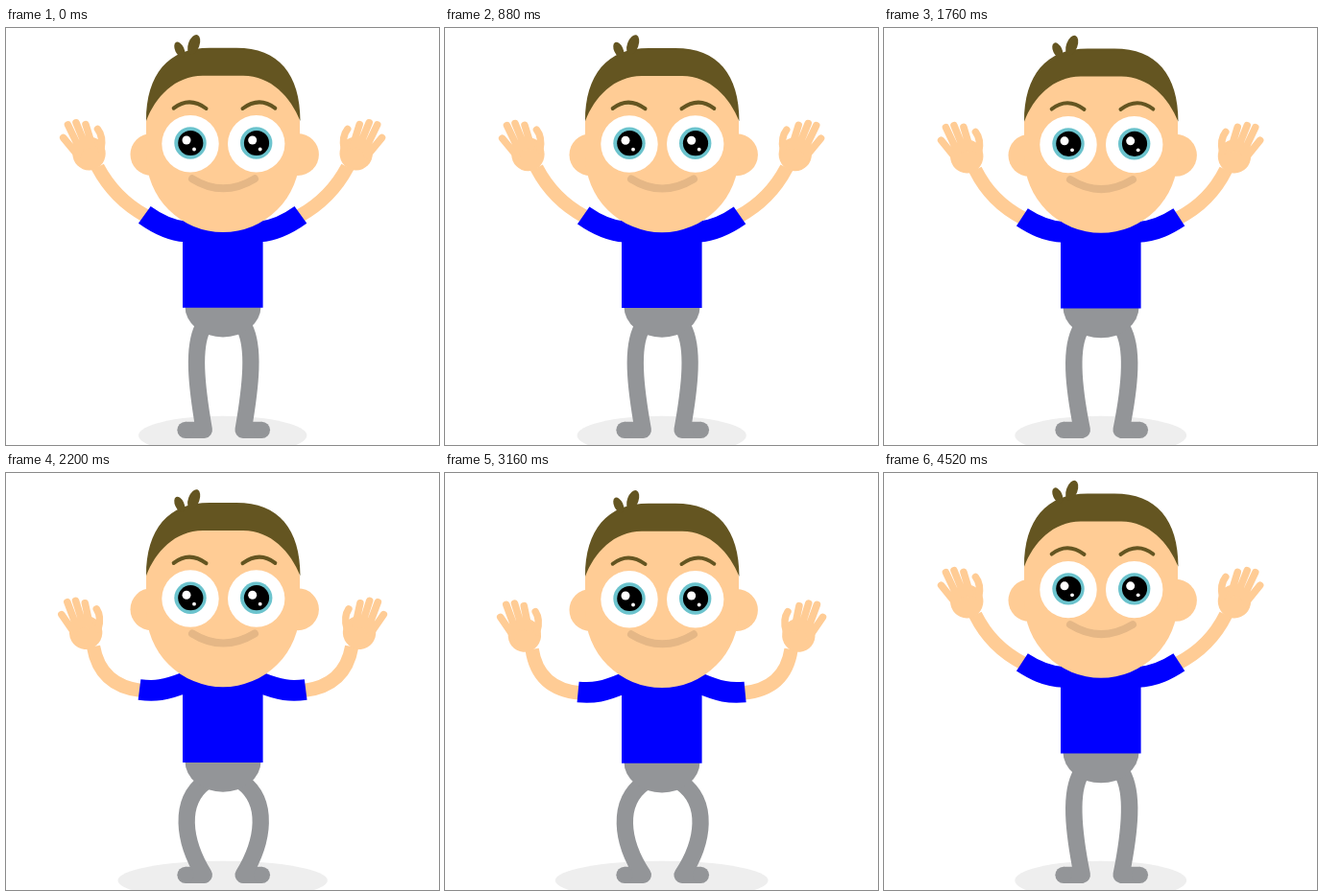
These frames come from a looping animation (451x435 px, 4.56 s). An HTML page with a canvas:

```html
<!DOCTYPE html>
<html lang="en">
<head>
<meta charset="utf-8">
<title>Bouncing boy</title>
<style>
  html, body { margin: 0; width: 100%; height: 100%; overflow: hidden; background: #fff; }
  canvas { display: block; }
</style>
</head>
<body>
<canvas id="stage" width="451" height="435"></canvas>
<script>
const ctx = document.getElementById('stage').getContext('2d');
const SKIN = '#ffcc95', HAIR = '#645521', SHIRT = '#0000ff', TROUSERS = '#939598';
const LOOP = 4560, STEP = 40, BOUNCE = 920;

const mix = (a, b, u) => a.map((v, i) => v + (b[i] - v) * u);

function ellipse(color, x, y, rx, ry = rx, angle = 0) {
  ctx.fillStyle = color;
  ctx.beginPath();
  ctx.ellipse(x, y, rx, ry, angle * Math.PI / 180, 0, 7);
  ctx.fill();
}

function fill(color, d) {
  ctx.fillStyle = color;
  ctx.fill(new Path2D(d));
}

function stroke(color, width, d, cap = 'round') {
  ctx.strokeStyle = color;
  ctx.lineWidth = width;
  ctx.lineCap = cap;
  ctx.lineJoin = 'round';
  ctx.stroke(new Path2D(d));
}

// Draws a part, then its mirror image about a vertical axis
function bothSides(axis, draw) {
  draw();
  ctx.save();
  ctx.translate(2 * axis, 0);
  ctx.scale(-1, 1);
  draw();
  ctx.restore();
}

function leg(u) {
  const p = mix([205, 312.5, 194.5, 333, 198, 371], [207, 322.5, 180, 343, 184, 383], u);
  stroke(TROUSERS, 17.3, `M${p[0]} ${p[1]}C${p.slice(2)} 206.3 419.3L187 419.3`, 'butt');
  ellipse(TROUSERS, 187, 419.3, 8.65);
}

function hand(u) {
  ctx.save();
  ctx.translate(80 - 1.5 * u, 110 + 35 * u);
  ctx.rotate(5 * u * Math.PI / 180);
  ctx.translate(-80, -110);
  ellipse(SKIN, 86.5, 131, 17.2, 17.5);
  stroke(SKIN, 7.5, 'M59.7 114.5L75 133M64.5 101L77 127M73 98.8L83 123M83 100.5L90 123');
  stroke(SKIN, 7.5, 'M95.5 105.5Q101.5 113 99 126');
  ctx.restore();
}

function arm(u) {
  const a = mix([95.5, 145, 113, 178, 145.5, 196], [91, 181, 98, 222, 141, 227], u);
  stroke(SKIN, 14.3, `M${a[0]} ${a[1]}Q${a.slice(2)}`, 'butt');
  hand(u);
  const s = mix([144.3, 194.8, 155, 202.5, 169, 211, 187, 212.5],
                [139, 226, 155, 228, 165, 227, 188, 218], u);
  stroke(SHIRT, 21.8, `M${s[0]} ${s[1]}C${s.slice(2)}`, 'butt');
}

function eye(x) {
  ellipse('#fff', x, 120.8, 29.7);
  ellipse('#6bc3cd', x, 120, 16.7);
  ellipse('#000', x + 0.3, 120, 13.1);
  ellipse('#fff', x - 4, 117, 4.5);
  ellipse('#fff', x + 4, 126.5, 1.9);
}

function head() {
  bothSides(227.7, () => ellipse(SKIN, 151.5, 132, 22));
  fill(SKIN, 'M146 97Q154 45 205 45H247Q298 45 306 97V133A80 80 0 0 1 146 133Z');
  fill(HAIR, 'M146 97C146 48 169 20.7 212 20.7H240C284 20.7 306.5 48 306.5 97' +
    'C296.5 72 276 49.7 247 49.7H205C176 49.7 155.5 72 146 97Z');
  ellipse(HAIR, 195.7, 17.3, 5.8, 10.8, 20);
  ellipse(HAIR, 180.8, 22.5, 4.7, 8.5, -25);
  bothSides(227.5, () => stroke(HAIR, 4, 'M174.7 83.7Q191 71 208.5 84'));
  eye(192);
  eye(260.7);
  stroke('#e5b786', 8, 'M194 157.3Q226 177.3 259 157.3');
}

// u is 0 standing tall; the deepest crouch passes a little beyond 1
function draw(u) {
  const drop = 10.2 * u;
  ctx.clearRect(0, 0, 451, 435);
  ellipse('#eee', 225.7, 425, 87.7 + 21.5 * u, 20.3);
  bothSides(226.7, () => leg(u));
  ctx.save();
  ctx.translate(0, drop);
  fill(TROUSERS, 'M186.5 290.5H265.5A39.5 32 0 0 1 186.5 290.5');
  ctx.restore();
  bothSides(225.6, () => arm(u));
  ctx.save();
  ctx.translate(0, drop);
  fill(SHIRT, 'M184 199H267.6V291.7H184Z');
  head();
  ctx.restore();
}

let start;
function tick(now) {
  start ??= now;
  const t = Math.floor((now - start) % LOOP / STEP) * STEP;
  draw(1.126 * (1 - Math.cos(2 * Math.PI * t / BOUNCE)) / 2);
  requestAnimationFrame(tick);
}
requestAnimationFrame(tick);
</script>
</body>
</html>
```
